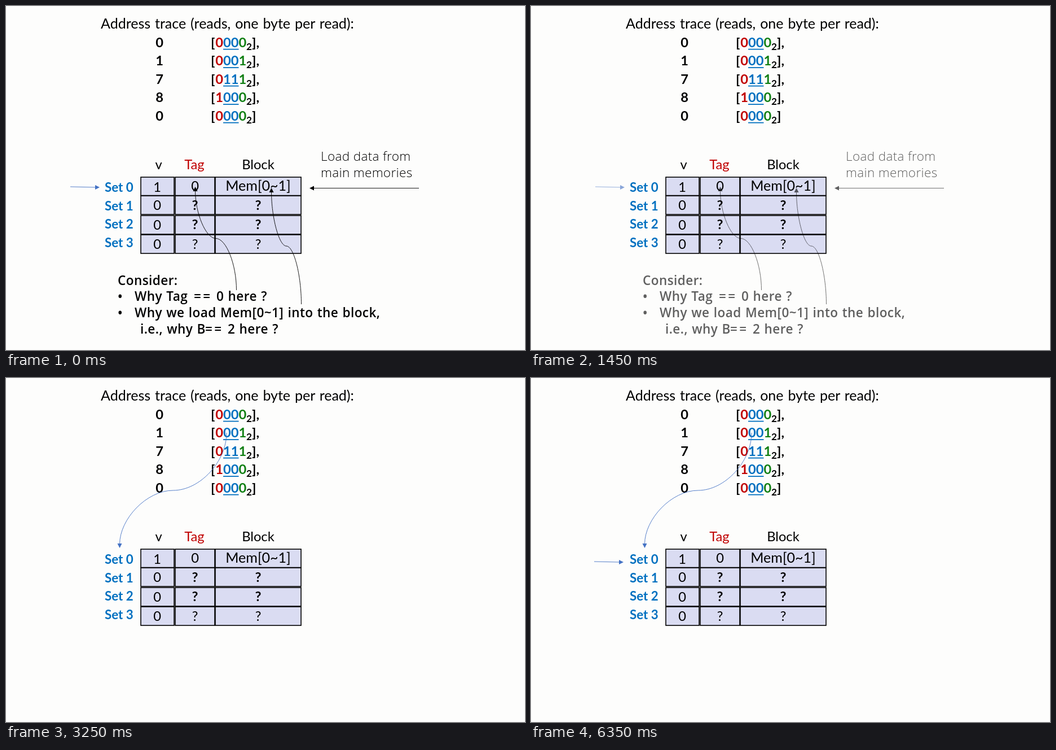
Write an HTML page that moves like this. It is 920 px wide and 609 px high and loops after 8000 ms.

```html
<!DOCTYPE html>
<html lang="en">
<head>
<meta charset="utf-8">
<title>Cache lookup</title>
<style>
  html, body { margin: 0; width: 100%; height: 100%; overflow: hidden; background: #fdfdfc; }
  svg { display: block; width: 100%; height: 100%; }
  text { font: 23.7px Lato, sans-serif; white-space: pre; }
  .bold { font-weight: 700; }
  .mid { text-anchor: middle; }
  .title { font-size: 25px; word-spacing: 1.5px; }
  .set { font-size: 22.3px; font-weight: 700; fill: #0070c0; }
  .sub { font-size: 17px; }
  .light { font: 300 22.5px "Open Sans", sans-serif; letter-spacing: .35px; }
  .note { font: 600 22.5px "Open Sans", sans-serif; letter-spacing: .45px; word-spacing: 1px; }
  .equals { letter-spacing: 3.5px; }
  .cell { fill: #dadcf2; stroke: #000; stroke-width: 1.6; }
  .arrow path { fill: none; stroke: currentColor; stroke-width: .9; }
  .arrow polygon { fill: currentColor; }
</style>
</head>
<body>
<svg viewBox="0 0 920 609">
  <g id="slide"></g>
  <g id="notes"></g>
  <g id="indexArrow"></g>
  <g id="setArrow"></g>
</svg>
<script>
const LOOP = 8000;
const RED = '#c00000', BLUE = '#0070c0', GREEN = '#0f7f12', ARROW_BLUE = '#4472c4';
const layer = id => document.getElementById(id);

const text = (x, y, content, cls = '', fill = '#000') =>
  `<text x="${x}" y="${y}" class="${cls}" ${cls === 'set' ? '' : `fill="${fill}"`}>${content}</text>`;

const equals = x => `<tspan x="${x}" class="equals">==</tspan>`;

// The arrowhead touches (x, y); (dx, dy) is its direction.
function arrow(path, x, y, dx, dy, color) {
  const bx = x - dx * 8, by = y - dy * 8;
  const head = `${x},${y} ${bx - dy * 4},${by + dx * 4} ${bx + dy * 4},${by - dx * 4}`;
  return `<g class="arrow" color="${color}"><path d="${path}"/><polygon points="${head}"/></g>`;
}

function straight(x1, y1, x2, y2, color) {
  const dx = Math.sign(x2 - x1);
  return arrow(`M${x1},${y1}L${x2 - dx * 7},${y2}`, x2, y2, dx, 0, color);
}

// S-shaped connector that leaves and arrives vertically.
function curved(x1, y1, x2, y2, color) {
  const mx = (x1 + x2) / 2, my = (y1 + y2) / 2, dy = Math.sign(y2 - y1);
  const path = `M${x1},${y1}C${x1},${(y1 + my) / 2} ${(x1 + mx) / 2},${my} ${mx},${my}` +
    `S${x2},${(my + y2) / 2} ${x2},${y2 - dy * 7}`;
  return arrow(path, x2, y2, 0, dy, color);
}

function traceRow(address, index, rows) {
  const y = 72.7 + index * 32.5;
  const bits = address.toString(2).padStart(4, '0');
  const end = index < rows.length - 1 ? '],' : ']';
  return text(272, y, address, 'bold mid') +
    text(363, y, '[', 'bold') +
    text(371.3, y, bits[0], 'bold', RED) +
    text(385, y, bits.slice(1, 3), 'bold', BLUE) +
    text(412.6, y, bits[3], 'bold', GREEN) +
    text(426, y + 5, '2', 'bold sub') +
    text(436, y, end, 'bold') +
    `<rect x="385" y="${y + 3}" width="27.5" height="1.8" fill="${BLUE}"/>`;
}

const columns = [[239, 298], [300, 370], [371, 523]];
const rowTops = [303, 336, 371, 405];

function tableRow(top, index) {
  const height = index ? 33 : 32.5;
  const cells = columns.map(([left, right]) =>
    `<rect class="cell" x="${left}" y="${top}" width="${right - left}" height="${height}"/>`).join('');
  const y = [327, 361, 395, 430][index];
  const style = index === 1 || index === 2 ? 'bold mid' : 'mid';
  return cells +
    text(175, 329 + index * 32.6, `Set ${index}`, 'set') +
    text(268, [329, 361, 396, 430][index], index ? 0 : 1, 'mid') +
    text(335, y, index ? '?' : '0', style) +
    text(447, y, index ? '?' : 'Mem[0~1]', style + (index ? '' : ' title'));
}

layer('slide').innerHTML =
  text(168, 40, 'Address trace (reads, one byte per read):', 'title') +
  [0, 1, 7, 8, 0].map(traceRow).join('') +
  text(270.5, 289, 'v', 'mid') +
  text(334, 289, 'Tag', 'mid', RED) +
  text(447, 289, 'Block', 'mid') +
  rowTops.map(tableRow).join('');

layer('notes').innerHTML =
  straight(114, 320, 166, 321, ARROW_BLUE) +
  straight(732, 322.5, 538, 322.5, '#000') +
  curved(408.5, 503, 335.5, 320, '#000') +
  curved(523.5, 528, 470.5, 322, '#000') +
  text(558, 274, 'Load data from', 'light') +
  text(558, 303, 'main memories', 'light') +
  text(198, 493.5, 'Consider:', 'note') +
  text(198, 522, '•', 'note') +
  text(228, 522, `Why Tag ${equals(333)} 0 here ?`, 'note') +
  text(198, 551, '•', 'note') +
  text(228, 551, 'Why we load Mem[0~1] into the block,', 'note') +
  text(238, 580, `i.e., why B ${equals(353)} 2 here ?`, 'note');

layer('indexArrow').innerHTML = curved(391, 97, 201.5, 301, ARROW_BLUE);
layer('setArrow').innerHTML = straight(112, 325, 164, 326, ARROW_BLUE);

function fade(time, start, duration = 600) {
  const p = Math.min(1, Math.max(0, (time - start) / duration));
  return p * p * (3 - 2 * p);
}

const begin = performance.now();
function draw() {
  const time = (performance.now() - begin) % LOOP;
  layer('notes').style.opacity = 1 - fade(time, 1200);
  layer('indexArrow').style.opacity = fade(time, 2650);
  layer('setArrow').style.opacity = fade(time, 5270);
  requestAnimationFrame(draw);
}
draw();
</script>
</body>
</html>
```
